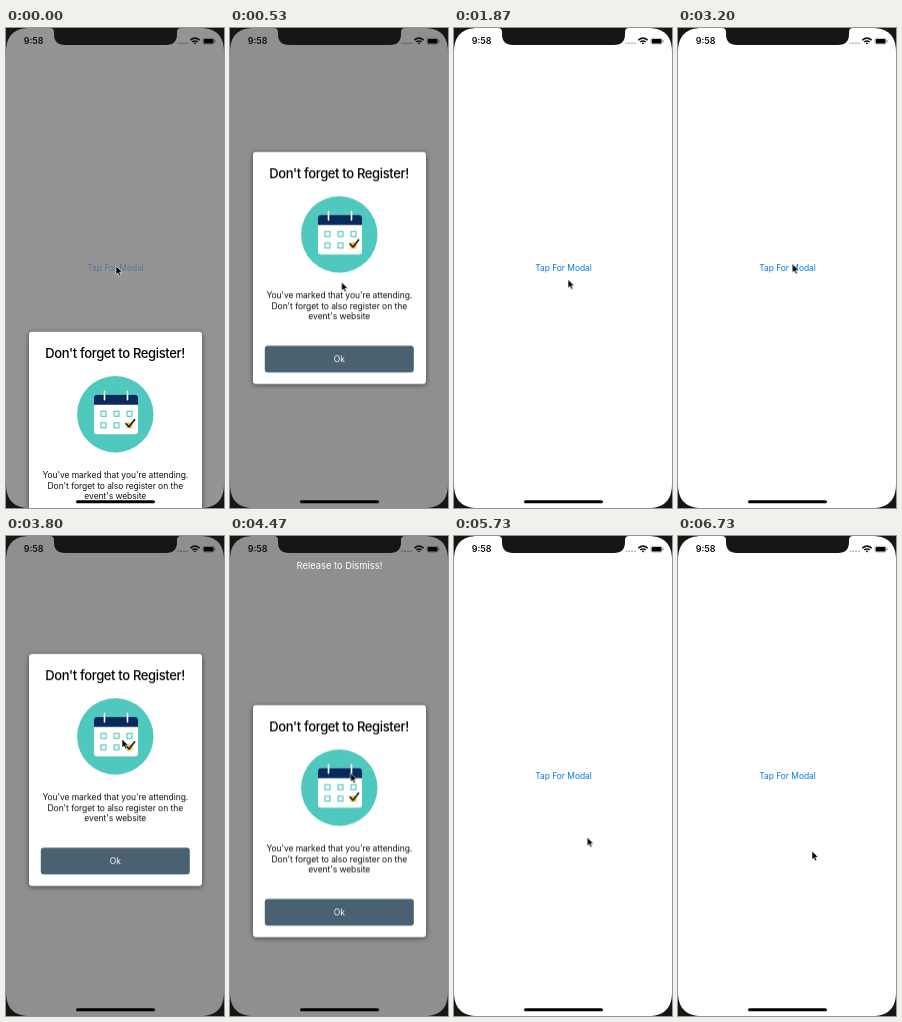
Write an HTML page that moves like this. It is 218x480 px and loops after 6.79 s.

```html
<!DOCTYPE html>
<html lang="en">
<head>
<meta charset="utf-8">
<title>Modal demo</title>
<style>
html, body { margin: 0; width: 100%; height: 100%; overflow: hidden; background: #fff; }
svg { display: block; width: 100vw; height: 100vh; }
text { font-family: Inter, "Liberation Sans", sans-serif; text-anchor: middle; }
.title { font-size: 13px; font-weight: 500; letter-spacing: -.35px; }
.body { font-size: 8.5px; letter-spacing: -.06px; }
.card { filter: drop-shadow(0 1px 2.5px rgba(0, 0, 0, .55)); }

#link, #dim, #hint, #modal, #cursor { animation: 6790ms linear infinite; }
#link { animation-name: link; }
#dim { animation-name: dim; }
#hint { animation-name: hint; }
#modal { animation-name: modal; }
#cursor { animation-name: cursor; }

@keyframes link {
  0%, 2% { opacity: .4; }
  5%, 47.2% { opacity: 1; }
  48.2%, 51% { opacity: .4; }
  54%, 100% { opacity: 1; }
}
@keyframes dim {
  0% { opacity: .42; }
  1%, 22.53% { opacity: .44; }
  26.95%, 48.16% { opacity: 0; }
  50.52%, 79.53% { opacity: .44; }
  83.95%, 100% { opacity: 0; }
}
@keyframes hint {
  0%, 64.8% { opacity: 0; }
  65.83%, 79.53% { opacity: 1; }
  81%, 100% { opacity: 0; }
}
/* spring in, drag down, fall out */
@keyframes modal {
  0% { transform: translateY(181px); animation-timing-function: cubic-bezier(.25, .5, .4, 1); }
  4.57% { transform: translateY(-9px); animation-timing-function: ease-in-out; }
  7.95% { transform: none; }
  22.53% { transform: none; animation-timing-function: ease-in; }
  26.95%, 48.16% { transform: translateY(380px); }
  50.07% { transform: translateY(181px); animation-timing-function: cubic-bezier(.25, .5, .4, 1); }
  54.64% { transform: translateY(-9px); animation-timing-function: ease-in-out; }
  58.03% { transform: none; }
  59.65% { transform: none; animation-timing-function: ease-in-out; }
  67.75% { transform: translateY(51px); }
  76.58% { transform: translateY(65px); }
  78.5% { transform: translateY(69px); }
  79.53% { transform: translateY(69px); animation-timing-function: ease-in; }
  83.95%, 100% { transform: translateY(380px); }
}
@keyframes cursor {
  0%, 2% { transform: translate(110px, 238px); }
  7.81% { transform: translate(111.5px, 254px); }
  11.78% { transform: translate(112px, 257px); animation-timing-function: ease-in-out; }
  21.65%, 22.53% { transform: translate(115px, 335px); animation-timing-function: ease-out; }
  27.54% { transform: translate(114px, 251.5px); animation-timing-function: ease-out; }
  31.37%, 50.07% { transform: translate(114.5px, 236px); animation-timing-function: ease-out; }
  55.97% { transform: translate(116px, 203px); }
  59.65% { transform: translate(117px, 192px); animation-timing-function: ease-in-out; }
  67.75% { transform: translate(121px, 243px); }
  76.58% { transform: translate(123px, 257px); }
  78.5%, 79.53% { transform: translate(124px, 261px); animation-timing-function: ease-in-out; }
  87.33% { transform: translate(137px, 318px); animation-timing-function: step-end; }
  99.11%, 100% { transform: translate(134px, 315px); }
}
</style>
</head>
<body>
<svg viewBox="0 0 218 480">
  <defs>
    <rect id="day" width="5" height="5" fill="#fff" stroke="#4fc8bd" stroke-width="1.1"/>
    <path id="corner" d="M0 0H24C8 0 0 8 0 24Z" fill="#161616"/>
  </defs>

  <rect width="218" height="480" fill="#fff"/>
  <text id="link" class="body" x="109.5" y="243" fill="#0a7af0">Tap For Modal</text>
  <rect id="dim" width="218" height="480"/>
  <text id="hint" x="109.5" y="32.5" font-size="9.4" fill="#fff">Release to Dismiss!</text>

  <g id="modal">
    <rect class="card" x="23" y="124" width="173" height="232" rx="3" fill="#fff"/>
    <text class="title" x="109" y="150">Don't forget to Register!</text>

    <circle cx="109.3" cy="206.5" r="38.2" fill="#4fc8bd"/>
    <rect x="88" y="187" width="44" height="39.5" rx="3" fill="#fff"/>
    <path d="M88 197V190a3 3 0 0 1 3-3H129a3 3 0 0 1 3 3V197Z" fill="#0a2a5e"/>
    <path d="M98.5 183.5V192M121.5 183.5V192" stroke="#fff" stroke-width="1.6" stroke-linecap="round"/>
    <use href="#day" x="95" y="203.5"/>
    <use href="#day" x="108" y="203.5"/>
    <use href="#day" x="121" y="203.5"/>
    <use href="#day" x="95" y="215"/>
    <use href="#day" x="108" y="215"/>
    <rect x="120.5" y="214.5" width="6" height="6" fill="#f4c542"/>
    <path d="M119.5 215.5L123 219L129 211.5" fill="none" stroke="#1b1b1b" stroke-width="1.7"/>

    <g class="body" fill="#111">
      <text x="109.3" y="270.3">You've marked that you're attending.</text>
      <text x="109.3" y="280.8">Don't forget to also register on the</text>
      <text x="109.3" y="291.3">event's website</text>
    </g>
    <rect x="34.8" y="317.8" width="149" height="26.8" rx="3" fill="#4a6172"/>
    <text class="body" x="109.3" y="334.3" fill="#fff">Ok</text>
  </g>

  <!-- status bar -->
  <text x="27.7" y="16.3" font-size="9" font-weight="600" fill="#111">9:58</text>
  <path d="M171.5 15.3H182" stroke="#000" stroke-opacity=".3" stroke-width="1.4" stroke-dasharray="1.8 1"/>
  <g fill="none" stroke="#111" stroke-width="1.5">
    <path d="M184.3 12.1Q189 8.1 193.7 12.1M186.2 14Q189 11.8 191.8 14"/>
  </g>
  <path d="M187.6 15.1Q189 14 190.4 15.1L189 16.6Z" fill="#111"/>
  <rect x="196.9" y="10.3" width="11.4" height="5.8" rx="1.6" fill="none" stroke="#111" stroke-opacity=".45" stroke-width=".6"/>
  <rect x="197.7" y="11" width="9.8" height="4.4" rx="1"/>
  <path d="M209.2 12.2V14.2" stroke="#111" stroke-opacity=".5" stroke-width=".8"/>

  <!-- device frame -->
  <use href="#corner"/>
  <use href="#corner" transform="translate(218) scale(-1 1)"/>
  <use href="#corner" transform="translate(0 480) scale(1 -1)"/>
  <use href="#corner" transform="translate(218 480) scale(-1 -1)"/>
  <path d="M44 0Q48 0 48 4V6Q48 17 59 17H160Q171 17 171 6V4Q171 0 175 0Z" fill="#161616"/>
  <rect x="70" y="472.2" width="79" height="3" rx="1.5"/>

  <path id="cursor" d="M0 0V8.6L2 6.9L3.4 10L4.9 9.3L3.5 6.3H6.2Z" stroke="#fff" stroke-width=".6"/>
</svg>
</body>
</html>
```
